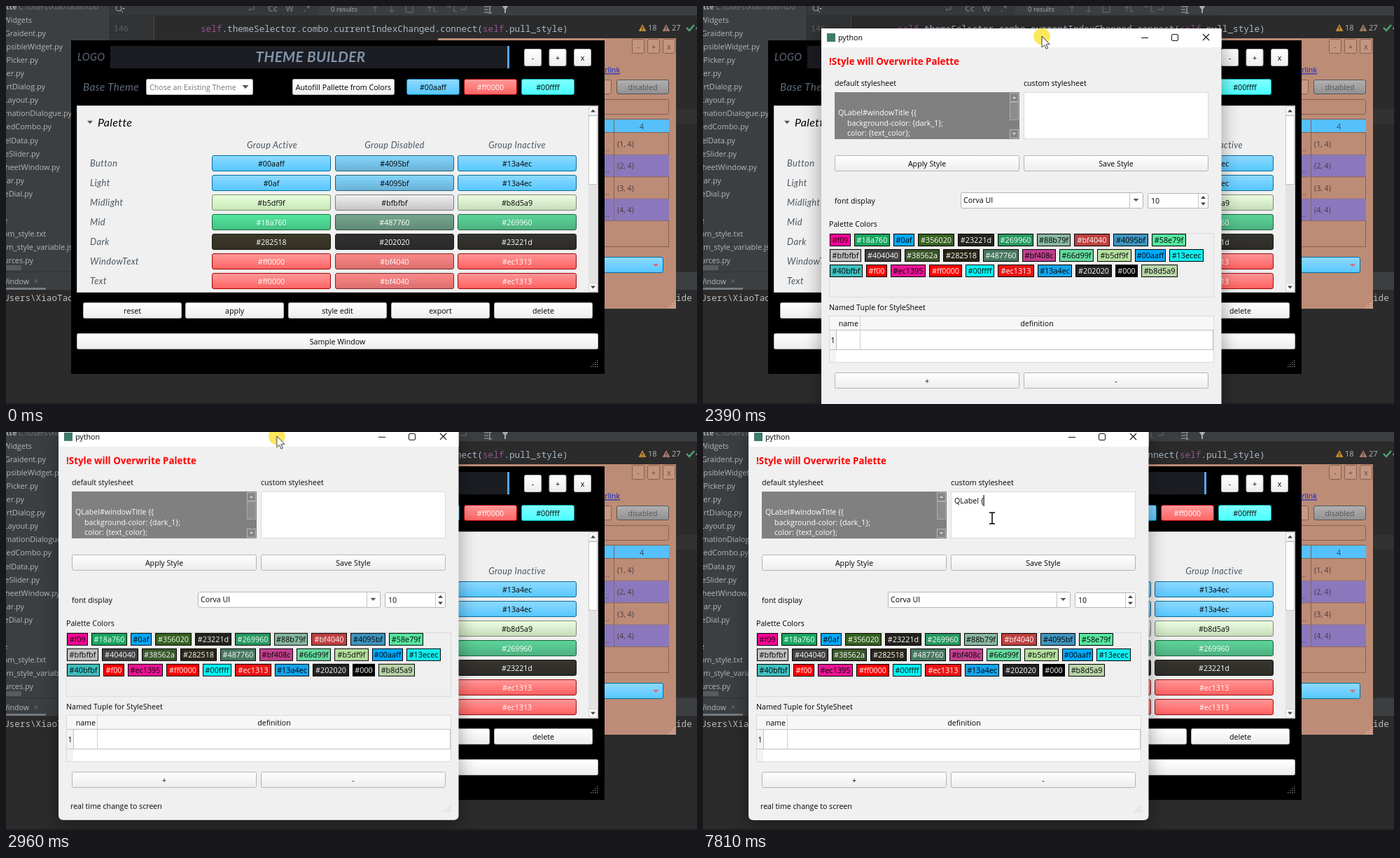
An HTML page that plays this animation: 987x568 px, repeating every 8 s.

```html
<!DOCTYPE html>
<html lang="en">
<head>
<meta charset="utf-8">
<title>Theme builder</title>
<style>
html, body { margin: 0; width: 100%; height: 100%; overflow: hidden; background: #2b2b2b; }
svg { display: block; width: 987px; height: 568px; }
text { font-family: "Open Sans", sans-serif; white-space: pre; }
.mono { font-family: "Noto Sans Mono", monospace; }
.ink { font-family: Lato, sans-serif; font-style: italic; letter-spacing: .4px; }
.bold { font-weight: 700; }
.shadow { filter: drop-shadow(0 7px 13px rgba(0, 0, 0, .36)); }

#dialog, #cursor, #arrow, #beam, #press, #typing, #caret { animation: 8s linear infinite; }
#dialog { animation-name: dialog; }
#cursor { animation-name: cursor; }
#arrow, #beam, #press, #typing, #caret { animation-timing-function: step-end; }
#arrow { animation-name: arrow; }
#beam { animation-name: beam; }
#press { animation-name: press; }
#typing { animation-name: typing; }
#caret { animation-name: caret; }

@keyframes dialog {
  0%, 15.4% { transform: translate(136px, 64px) scale(.9); opacity: 0; }
  16.8%, 17.7% { transform: translate(116.8px, 48.8px) scale(.955); opacity: 1; }
  18.6%, 30.5% { transform: translate(104px, 38px); }
  32.1% { transform: translate(61px, 2px); }
  34.3%, 35.2% { transform: translate(47px, -1px); }
  37.5%, 100% { transform: none; opacity: 1; }
}
@keyframes cursor {
  0%, 1.5% { transform: translate(791px, 502px); }
  6.25% { transform: translate(560px, 440px); }
  8.75% { transform: translate(452px, 414px); }
  10.6% { transform: translate(463px, 422px); }
  12.5% { transform: translate(478px, 433px); }
  16.8%, 17.7% { transform: translate(489px, 436px); }
  24% { transform: translate(500px, 200px); }
  28.7%, 30.5% { transform: translate(484px, 43px); }
  32.1% { transform: translate(437px, 8px); }
  34.3%, 35.2% { transform: translate(423px, 5px); }
  37.5%, 38.7% { transform: translate(377px, 6px); }
  43.1% { transform: translate(342px, 100px); }
  44.3% { transform: translate(360px, 108px); }
  47.5%, 100% { transform: translate(413px, 123px); }
}
@keyframes arrow { 0% { opacity: 0; } 1.5% { opacity: 1; } 44.3%, 100% { opacity: 0; } }
@keyframes beam { 0% { opacity: 0; } 44.3%, 100% { opacity: 1; } }
@keyframes press {
  0%, 15.4%, 38.3%, 49.8%, 100% { opacity: 0; }
  13.5%, 29%, 48.1% { opacity: .85; }
}
@keyframes caret {
  0%, 56.125%, 69.5%, 94.5% { opacity: 0; }
  48.75%, 63.125%, 75.75%, 96.125%, 100% { opacity: 1; }
}
@keyframes typing {
  0% { transform: none; }
  77.25% { transform: translateX(8.3px); }
  82.875% { transform: translateX(13.9px); }
  84.125% { transform: translateX(19.8px); }
  85.375% { transform: translateX(26.3px); }
  86.75% { transform: translateX(32.3px); }
  87.875% { transform: translateX(35px); }
  90% { transform: translateX(37.1px); }
  96.125%, 100% { transform: translateX(41.8px); }
}
</style>
</head>
<body>
<svg viewBox="0 0 987 568">
  <defs id="defs">
    <linearGradient id="white" x2="0" y2="1">
      <stop stop-color="#fff"/><stop offset="1" stop-color="#ededed"/>
    </linearGradient>
    <clipPath id="styleClip"><rect x="84" y="86" width="250" height="65"/></clipPath>
  </defs>
  <g id="desktop"></g>
  <g id="builder"></g>
  <g id="dialog"></g>
  <g id="cursor">
    <circle id="press" cy=".5" r="11.8" fill="#fce341"/>
    <path id="arrow" d="M0 0V16l3.7-3.4 2.5 5.5 2.4-1.1-2.4-5.3h5z" fill="#fff" stroke="#222" stroke-width=".9"/>
    <g id="beam" fill="none">
      <path d="M-4-8h3l1 1 1-1h3M-4 8h3l1-1 1 1h3M0-7V7" stroke="#fff" stroke-width="3" opacity=".6"/>
      <path d="M-4-8h3l1 1 1-1h3M-4 8h3l1-1 1 1h3M0-7V7" stroke="#000" stroke-width="1.5"/>
    </g>
  </g>
</svg>
<script>
const $ = id => document.getElementById(id);

const toRgb = hex => (hex.length > 4 ? hex.slice(1).match(/../g) : [...hex.slice(1)].map(h => h + h))
  .map(h => parseInt(h, 16));

// Button gradient in the manner of Qt's Fusion style: HSV lightening that bleeds into saturation.
const lighter = ([s, v], f) => [Math.max(0, s - Math.max(0, v * f - 255) / 255), Math.min(255, v * f)];
const paint = hex => {
  const id = 'c' + hex.slice(1);
  if (!$(id)) {
    const rgb = toRgb(hex), max = Math.max(...rgb), span = max - Math.min(...rgb);
    const gray = (11 * rgb[0] + 16 * rgb[1] + 5 * rgb[2]) / 32;
    const css = ([s, v]) => `rgb(${rgb.map(c => Math.round(v * (1 - s * (max - c) / (span || 1))))})`;
    const [sat, val] = lighter([span / max, max], 1 + Math.max(1, (180 - gray) / 6) / 100);
    const base = [sat * .75, val];
    $('defs').insertAdjacentHTML('beforeend', `<linearGradient id="${id}" x2="0" y2="1">
      <stop stop-color="${css(lighter(base, 1.24))}"/><stop offset="1" stop-color="${css(lighter(base, 1.02))}"/>
      </linearGradient>`);
  }
  return `url(#${id})`;
};

// Text is placed by its vertical centre, boxes by their edges.
const text = (x, y, str, { size = 10.65, fill = '#000', at = 'start', cls = '', more = '' } = {}) =>
  `<text x="${x}" y="${y + size * .36}" font-size="${size}" fill="${fill}" text-anchor="${at}" class="${cls}" ${more}>${str}</text>`;
const mid = (x, y, str, o) => text(x, y, str, { ...o, at: 'middle' });
const fill = (x, y, x2, y2, color, more = '') =>
  `<rect x="${x}" y="${y}" width="${x2 - x}" height="${y2 - y}" fill="${color}" ${more}/>`;
const box = (x, y, x2, y2, color, line, rx = 0) =>
  fill(x + .5, y + .5, x2 - .5, y2 - .5, color, `rx="${rx}" style="stroke:${line}"`);
const path = (d, line, width = 1, more = '') =>
  `<path d="${d}" fill="none" stroke="${line}" stroke-width="${width}" ${more}/>`;
const tri = (x, y, w, h, color) => `<path d="M${x - w} ${y - h / 2}h${2 * w}l${-w} ${h}z" fill="${color}"/>`;
const button = (x, y, x2, y2, label, line = '#b4b4b4') =>
  box(x, y, x2, y2, 'url(#white)', line, 2) + mid((x + x2) / 2, (y + y2) / 2 + .5, label);
const tinted = (x, y, x2, y2, label, color, ink = '#000') =>
  box(x, y, x2, y2, paint(color), `color-mix(in srgb, ${color} 65%, #000)`, 2.5) +
  mid((x + x2) / 2, (y + y2) / 2 + .5, label, { fill: ink });
const grip = (x, y, color) => {
  let s = '';
  for (let i = 0; i < 4; i++)
    for (let j = 0; j <= i; j++) s += fill(x - 3 * j, y - 9 + 3 * i, x - 3 * j + 1.3, y - 7.7 + 3 * i, color);
  return s;
};

function desktop() {
  const gray = '#a9abad', dim = '#6b6e70', code = '#a9b7c6';
  const self = '<tspan fill="#94558d">self</tspan>';
  const files = [
    ['Widgets', 37], ['Graident.py', 57], ['apsibleWidget.py', 81], ['rPicker.py', 46], ['er.py', 26],
    ['rtDialog.py', 56], ['Layout.py', 46], ['mationDialogue.py', 94], ['edCombo.py', 65], ['elData.py', 46],
    ['eSlider.py', 48], ['heetWindow.py', 77], ['Bar.py', 26], ['eDial.py', 38], ['', 0], ['e', 2],
    ['om_style.txt', 57], ['om_style_variable.js', 95], ['urces.py', 39]
  ];
  let s = fill(0, 0, 987, 568, '#2b2b2b') + fill(0, 0, 148, 383, '#3c3f41') +
    fill(149, 0, 211, 383, '#313335') + fill(211, 14, 212, 383, '#45484a') +
    fill(149, 0, 987, 14, '#36393b') + fill(446, 0, 987, 14, '#3c3f41') + fill(149, 13, 987, 14, '#2f3133') +
    fill(957, 147, 987, 168, '#323232') + fill(0, 379, 987, 405, '#3c3f41') +
    fill(0, 379, 987, 380, '#323232') + fill(0, 370, 22, 377, '#585b5d') + fill(0, 402, 57, 405, '#747a80') +
    fill(0, 566, 987, 568, '#242526');

  s += text(0, 1.5, 'tte', { fill: gray, cls: 'bold' }) +
    text(18, 1.5, 'C:\\Users\\XiaoTaolin\\Do', { fill: '#777a7c' });
  files.forEach(([name, end], i) =>
    s += text(end, 20 + i * 19.07, name, { size: 10.9, fill: '#b4b6b8', at: 'end' }));
  s += text(33, 393, 'Window', { fill: '#b4b6b8', at: 'end' }) + mid(43, 393, '×', { fill: dim, size: 12 });

  s += `<circle cx="161" cy="3" r="4" fill="none" stroke="${gray}"/>` + path('M164 6l3 3', gray) +
    tri(168, 4, 2, 2, gray) + path('M354 0v5h-7m2-2l-2 2 2 2', dim) +
    mid(381, 4, 'Cc', { fill: dim, size: 12, cls: 'bold' }) + mid(405, 4, 'W', { fill: dim, size: 12, cls: 'bold' }) +
    mid(430, 4, '.*', { fill: dim, size: 12, cls: 'bold' }) + mid(483, 4.5, '0 results', { fill: gray, size: 9.6 }) +
    path('M527 9V0m-3 3l3-3 3 3M551 0v9m-3-3l3 3 3-3M571 0v9h10v-9M602 2h6m-3-3v9m6-9v9h4m15-7h6m4-2v9h4m5-9h8v6h-8', dim) +
    path('M683 1h6m-6 4h6m-6 4h6m2-9v10m-2 0h5m-5-10h5', gray, 1.2) +
    `<path d="M708-1h10l-4 6v5h-2V5z" fill="${gray}"/>`;

  s += text(154, 32, '146', { fill: '#606366', cls: 'mono', size: 11.6 }) +
    text(278, 32, `${self}.themeSelector.combo.currentIndexChanged.connect(${self}.pull_style)`,
      { fill: code, cls: 'mono', size: 12.68 }) +
    text(-3, 416, 'Users\\XiaoTao', { fill: '#bbb', cls: 'mono', size: 12.68 }) +
    text(957, 416, 'ide', { fill: '#bbb', cls: 'mono', size: 12.68 });
  for (const [x, color, n] of [[909, '#c48a2c', 18], [943, '#a87b6c', 27]])
    s += `<path d="M${x} 26l5.5 10h-11z" fill="${color}"/>` + path(`M${x} 29.5v3.4m0 1v1.2`, '#2b2b2b', 1.2) +
      text(x + 8, 31.5, n, { fill: '#b4b6b8', size: 11 });
  s += path('M972 31l4 4 7-8', '#4fa573', 2.4) + text(985, 31.5, '4', { fill: '#b4b6b8', size: 11 });

  // Sample window behind the builder
  const skin = '#bd8c76', line = '#86604f', faded = '#5c4a43';
  s += fill(617, 46, 957, 432, skin);
  ['-', '+', 'x'].forEach((c, i) => s += box(894 + 22 * i, 47, 912 + 22 * i, 68, '#c4957f', line, 2) +
    mid(903 + 22 * i, 58, c, { fill: faded }));
  s += text(877, 91.5, 'hyperlink', { fill: '#0a20c8', at: 'end', more: 'text-decoration="underline"' }) +
    box(840, 105, 865, 126, '#c89a84', line, 2) + tinted(872, 105, 947, 126, 'disabled', '#848484', '#555') +
    box(800, 133, 947, 155, skin, line, 2) + box(800, 161, 947, 344, skin, line) +
    fill(800, 162, 947, 181, '#55c0fb') + path('M868.5 162V306M800 180.5H947', line);
  for (let i = 0; i < 4; i++) {
    const y = 181 + i * 31.4;
    if (i % 2) s += fill(800, y, 947, y + 31.4, '#8b78bc');
    s += text(873, y + 16, `(${i + 1}, 4)`, { fill: '#493c40' }) + text(853, y + 22, '...', { fill: '#493c40' }) +
      path(`M800 ${y + 31.4}H947M868.5 ${y}v31`, line, .8);
  }
  return s + mid(908, 172, '4', { fill: '#284a60' }) + tinted(800, 358, 939, 381, '', '#00aaff') +
    tri(928, 370, 4, 4, '#f06060') + grip(955, 430, '#ead0c4');
}

function builder() {
  const slate = '#5f6b7b';
  let s = fill(93, 49, 855, 525, '#000') + fill(149, 57, 716, 89, '#1b1d23') + fill(716, 57, 719, 89, '#56a6f0') +
    text(102, 73, 'LOGO', { size: 14.5, fill: slate, cls: 'ink' }) +
    mid(435, 72.5, 'THEME BUILDER', { size: 20.6, fill: '#8194a9', cls: 'ink bold' }) +
    text(110, 116, 'Base Theme', { size: 15.2, fill: slate, cls: 'ink' });
  ['-', '+', 'x'].forEach((c, i) => s += button(740 + 35.5 * i, 61, 765 + 35.5 * i, 86, c));
  s += box(200, 104, 353, 127, '#fff', '#b4b4b4', 2) + text(205, 116, 'Chose an Existing Theme', { fill: '#777' }) +
    tri(342, 115.5, 4.5, 5, '#555') + button(409, 104, 555, 127, 'Autofill Pallette from Colors') +
    tinted(572, 104, 648, 127, '#00aaff', '#00aaff') + tinted(654, 104, 730, 127, '#ff0000', '#ff0000', '#fff') +
    tinted(736, 104, 812, 127, '#00ffff', '#00ffff');

  s += box(101, 142, 846, 409, '#f0f0f0', '#c8c8c8') + fill(832, 143, 845, 408, '#e3e3e3') +
    box(832, 143, 845, 156, '#f8f8f8', '#d4d4d4') + box(832, 156, 845, 255, '#fff', '#c4c4c4') +
    box(832, 395, 845, 408, '#f8f8f8', '#d4d4d4') + tri(838.5, 149.5, 3.5, -4, '#444') + tri(838.5, 401.5, 3.5, 4, '#444') +
    tri(120, 166, 4, 4.5, '#555') + text(131, 166, 'Palette', { size: 16, cls: 'ink' });
  ['Active', 'Disabled', 'Inactive'].forEach((g, i) =>
    s += mid(380 + 175 * i, 198, 'Group ' + g, { size: 12.5, fill: '#4a5763', cls: 'ink' }));

  [
    ['Button', '#00aaff #4095bf #13a4ec'],
    ['Light', '#0af #4095bf #13a4ec'],
    ['Midlight', '#b5df9f #bfbfbf #b8d5a9'],
    ['Mid', '#18a760 #487760 #269960', '#fff'],
    ['Dark', '#282518 #202020 #23221d', '#fff'],
    ['WindowText', '#ff0000 #bf4040 #ec1313', '#fff'],
    ['Text', '#ff0000 #bf4040 #ec1313', '#fff']
  ].forEach(([name, colors, ink], i) => {
    const y = 224.7 + i * 27.93, top = Math.round(y - 11.5);
    s += text(120, y, name, { size: 12.9, fill: '#4a5763', cls: 'ink' });
    colors.split(' ').forEach((c, j) => {
      const x = Math.round(294.3 + 175.3 * j);
      s += tinted(x, top, x + 170, top + 23, c, c, ink);
    });
  });
  ['reset', 'apply', 'style edit', 'export', 'delete'].forEach((l, i) => {
    const x = Math.round(109.5 + 146.75 * i);
    s += button(x, 423, x + 141, 446, l);
  });
  return s + button(101, 467, 846, 490, 'Sample Window') + grip(844, 514, '#8a8a8a');
}

function dialog() {
  const edge = '#dadada', light = { fill: '#fff' };
  let s = `<path class="shadow" d="M65-6H636.5V547q0 7-7 7H72q-7 0-7-7z" fill="#f0f0f0"/>` +
    fill(65, -6, 636.5, 21, '#fff') + fill(73, 1, 85, 13, '#3f7a6b') + text(89, 7.5, 'python') +
    path('M522 7.5h10M610 2l9 9m0-9l-9 9', '#111', 1.1) + fill(565.5, 2.5, 574.5, 11.5, 'none', 'rx="1.5" stroke="#111"') +
    text(76, 41, '!Style will Overwrite Palette', { size: 13.37, fill: '#f00', cls: 'bold' }) +
    text(84, 72.5, 'default stylesheet') + text(354, 72.5, 'custom stylesheet');

  s += fill(84, 85, 348, 152, '#808080') + '<g clip-path="url(#styleClip)">' +
    text(89, 114, 'QLabel#windowTitle {{', light) + text(102, 129, 'background-color: {dark_1};', light) +
    text(102, 143.5, 'color: {text_color};', light) + '</g>' +
    box(334, 86, 347, 99, '#858585', '#b8b8b8') + box(334, 99, 347, 125, '#8c8c8c', '#a9a9a9') +
    box(334, 138, 347, 151, '#858585', '#b8b8b8') + tri(340.5, 92.5, 2.5, -3, '#ddd') + tri(340.5, 144.5, 2.5, 3, '#ddd') +
    box(354, 85, 618, 152, '#fff', edge) + text(359, 98, 'QLabel {') +
    `<g id="typing">${fill(359, 88, 405, 108, '#fff')}<g id="caret">${fill(358.6, 90, 359.8, 106, '#000')}</g></g>`;

  s += button(84, 175, 348, 198, 'Apply Style') + button(354, 175, 618, 198, 'Save Style') +
    text(84, 240, 'font display') + box(264, 228, 525, 251, '#fff', '#b4b4b4', 2) + text(268, 239.5, 'Corva UI') +
    path('M505.5 229v21', '#c4c4c4') + tri(514.5, 239, 4, 4, '#555') +
    box(531, 229, 618, 251, '#fff', '#b4b4b4', 2) + text(536, 240.5, '10') + path('M603.5 230v20', '#c4c4c4') +
    tri(610.5, 235, 3.5, -4, '#444') + tri(610.5, 244.5, 3.5, 4, '#444');

  s += text(76, 273.5, 'Palette Colors') + box(76, 286, 626, 378, '#efefef', edge);
  [
    ['#f09 #18a760 #0af #356020 #23221d #269960 #88b79f #bf4040 #4095bf #58e79f', [30, 51, 30, 52, 52, 51, 48, 51, 50, 49]],
    ['#bfbfbf #404040 #38562a #282518 #487760 #bf408c #66d99f #b5df9f #00aaff #13ecec', [45, 52, 50, 52, 51, 48, 49, 49, 44, 49]],
    ['#40bfbf #f00 #ec1395 #ff0000 #00ffff #ec1313 #13a4ec #202020 #000 #b8d5a9', [47, 30, 50, 47, 41, 52, 49, 52, 32, 52]]
  ].forEach(([colors, widths], row) => {
    let x = 77;
    const y = 287 + 22 * row;
    colors.split(' ').forEach((c, i) => {
      const [r, g, b] = toRgb(c);
      s += box(x, y, x + widths[i], y + 18, c, '#000') +
        mid(x + widths[i] / 2, y + 9.2, c, { size: 10.8, fill: r + g + b > 382 ? '#000' : '#fff' });
      x += widths[i] + 5;
    });
  });

  return s + text(76, 392, 'Named Tuple for StyleSheet') + box(76, 404, 626, 471, '#fff', edge) +
    fill(77, 405, 625, 424, '#f7f7f7') + fill(77, 424, 86, 470, '#f3f3f3') +
    path('M77 424.5H625M77 452.5H625M86.5 424V452M624.5 424V452', '#c0c0c0') + path('M120.5 405V452', '#d0d0d0') +
    text(118, 415.5, 'name', { at: 'end' }) + mid(373, 415.5, 'definition') + mid(81.5, 439.5, '1') +
    button(84, 485, 348, 508, '+') + button(354, 485, 618, 508, '-') +
    text(82, 534, 'real time change to screen') + grip(624, 541, '#c6c6c6');
}

$('desktop').innerHTML = desktop();
$('builder').innerHTML = builder();
$('dialog').innerHTML = dialog();
</script>
</body>
</html>
```
